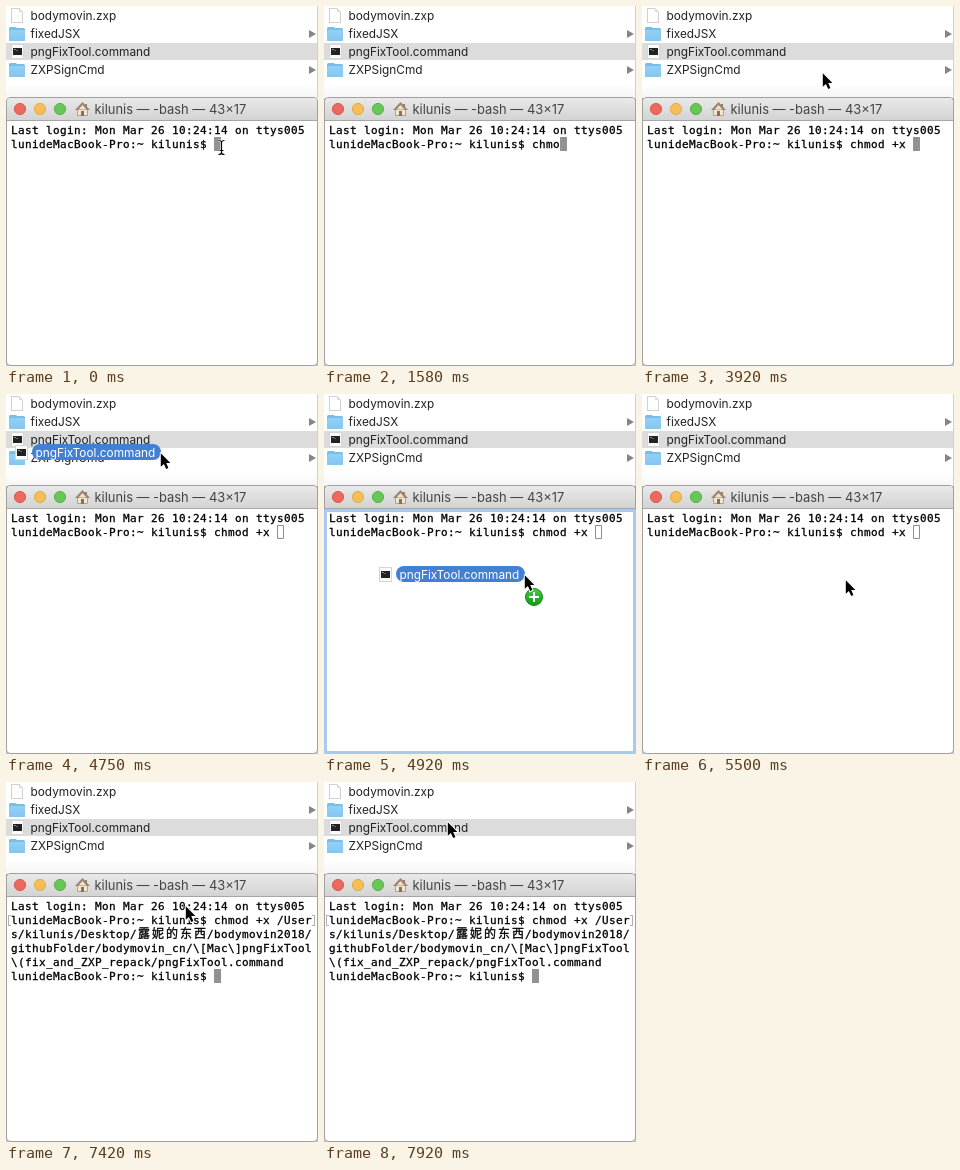
Recreate the animation shown at these times as an HTML page with a canvas. Size 312x360 px, loop 8000 ms.

```html
<!DOCTYPE html>
<html lang="en">
<head>
<meta charset="utf-8">
<title>Terminal drag and drop</title>
<style>
  html, body { margin: 0; width: 312px; height: 360px; overflow: hidden; background: #fff; }
  canvas { display: block; }
</style>
</head>
<body>
<canvas id="stage" width="312" height="360"></canvas>
<script>
const ctx = document.getElementById('stage').getContext('2d');
const LOOP = 8000, TICK = 1000 / 12;
const CELL_W = 7, CELL_H = 14, COLS = 43, LEFT = 5, TOP = 117;
const UI = 'Inter, Roboto, sans-serif';
const MONO = '11px "DejaVu Sans Mono", monospace';
const CJK = '500 12px "Noto Sans CJK SC", "Noto Sans CJK", sans-serif';

const LOGIN = 'Last login: Mon Mar 26 10:24:14 on ttys005\n';
const PROMPT = 'lunideMacBook-Pro:~ kilunis$ ';
const COMMAND = 'chmod +x ';
const PATH = '/Users/kilunis/Desktop/露妮的东西/bodymovin2018/githubFolder/' +
  'bodymovin_cn/\\[Mac\\]pngFixTool\\(fix_and_ZXP_repack/pngFixTool.command ';
const FILE = 'pngFixTool.command';
const FILE_SIZE = 11.85;

// All times below are in ticks of 1/12 s.
const KEYS = [10, 12, 16, 18, 21, 24, 29, 36, 41];
const DRAG = 57, DROP = 66, PASTE = 67, FOCUS = 72, ENTER = 79;
const GRAB = [150, 45];
const MOVES = [
  [[45, 200, 121], [46, 190, 92], [47, 180, 66], [49, 168, 53], [51, 158, 48], [54, ...GRAB],
   [56, ...GRAB], [57, 154, 58], [58, 174, 112], [59, 200, 180], [61, 203, 185], [78, 203, 185]],
  [[87, 206, 205], [88, 194, 162], [89, 179, 123], [90, 163, 87], [91, 148, 60],
   [92, 136, 43], [93, 128, 34], [94, 124, 36], [95, 123, 39], [96, 123, 39]]
];

function pointerAt(n) {
  const path = MOVES.find(p => n >= p[0][0] && n <= p[p.length - 1][0]);
  if (!path) return null;
  const i = Math.max(1, path.findIndex(k => k[0] >= n));
  const [t0, x0, y0] = path[i - 1], [t1, x1, y1] = path[i];
  const f = (n - t0) / (t1 - t0);
  return [Math.round(x0 + (x1 - x0) * f), Math.round(y0 + (y1 - y0) * f)];
}

function rect(x, y, w, h, color) {
  ctx.fillStyle = color;
  ctx.fillRect(x, y, w, h);
}

function frame(x, y, w, h, color, line = 1) {
  ctx.strokeStyle = color;
  ctx.lineWidth = line;
  ctx.strokeRect(x + line / 2, y + line / 2, w - line, h - line);
}

function poly(points, color) {
  ctx.beginPath();
  points.forEach(([x, y]) => ctx.lineTo(x, y));
  ctx.closePath();
  ctx.fillStyle = color;
  ctx.fill();
}

function round(x, y, w, h, r, color) {
  ctx.beginPath();
  ctx.roundRect(x, y, w, h, r);
  ctx.fillStyle = color;
  ctx.fill();
}

function disc(x, y, r, color, edge) {
  ctx.beginPath();
  ctx.arc(x, y, r, 0, Math.PI * 2);
  ctx.fillStyle = color;
  ctx.fill();
  ctx.strokeStyle = edge;
  ctx.lineWidth = 1;
  ctx.stroke();
}

function label(text, x, y, size, color) {
  ctx.font = `${size}px ${UI}`;
  ctx.fillStyle = color;
  ctx.fillText(text, x, y);
}

function vertical(y0, y1, from, to) {
  const g = ctx.createLinearGradient(0, y0, 0, y1);
  g.addColorStop(0, from);
  g.addColorStop(1, to);
  return g;
}

function paper(x, y) {
  poly([[x, y], [x + 8, y], [x + 12, y + 4], [x + 12, y + 15], [x, y + 15]], '#d0d0d0');
  poly([[x + 1, y + 1], [x + 7.5, y + 1], [x + 11, y + 4.5], [x + 11, y + 14], [x + 1, y + 14]], '#fff');
  poly([[x + 8, y], [x + 12, y + 4], [x + 8, y + 4]], '#dcdcdc');
}

function scriptIcon(x, y) {
  rect(x, y, 13, 15, '#d6d6d6');
  rect(x + 1, y + 1, 11, 13, '#fafafa');
  rect(x + 2, y + 4, 9, 7, '#222');
  rect(x + 3, y + 5, 2, 1, '#888');
  rect(x + 5, y + 6, 2, 1, '#666');
}

function folder(y) {
  round(3, y, 8, 5, 1.5, '#7abde6');
  round(3, y + 1, 16, 13, 1.5, '#7abde6');
  round(3, y + 3, 16, 11, 1.5, vertical(y + 3, y + 14, '#93d0f5', '#84c6f0'));
  poly([[303, y + 3], [310, y + 7], [303, y + 11]], '#858585');
}

function drawFinder() {
  rect(0, 0, 312, 92, '#fff');
  rect(0, 37, 312, 17, '#dcdcdc');
  paper(5, 2);
  folder(21);
  scriptIcon(5, 38);
  folder(57);
  ['bodymovin.zxp', 'fixedJSX', FILE, 'ZXPSignCmd']
    .forEach((name, i) => label(name, 24.5, 14 + 18 * i, FILE_SIZE, '#222'));
  rect(0, 78, 312, 14, vertical(78, 92, 'rgba(0,0,0,0)', 'rgba(0,0,0,.04)'));
  rect(311, 0, 1, 92, '#d0d0d0');
}

function drawHouse() {
  rect(71, 103, 11, 7, '#f1e6d2');
  frame(71, 103, 11, 7, '#b0a08c');
  rect(75, 105, 3, 5, '#8d6e54');
  rect(79, 98, 2, 4, '#9a7c66');
  poly([[76.5, 96], [84, 104], [69, 104]], '#9c8270');
  poly([[76.5, 99], [80.5, 103.5], [72.5, 103.5]], '#efe3cd');
}

function drawWindow() {
  rect(0, 352, 312, 8, '#c4c4c4');
  round(0, 91, 312, 269, 5, '#a0a0a0');
  round(1, 92, 310, 267, 4, '#fff');
  round(1, 92, 310, 22, [4, 4, 0, 0], vertical(92, 114, '#e9e9e9', '#d3d3d3'));
  rect(1, 114, 310, 1, '#a6a6a6');
  disc(14, 103, 5.6, '#ec695f', '#da5a50');
  disc(34, 103, 5.6, '#f4bf58', '#dfab49');
  disc(54, 103, 5.6, '#68c658', '#58b24a');
  drawHouse();
  label('kilunis — -bash — 43×17', 88.5, 108, 12.9, '#444');
}

// Writes on the character grid, wraps, and returns the pixel position of the caret.
function write(text) {
  let col = 0, row = 0;
  ctx.fillStyle = ctx.strokeStyle = '#000';
  ctx.lineWidth = 0.3;
  for (const ch of text) {
    if (ch === '\n') { col = 0; row++; continue; }
    const wide = ch > '\u2e80';
    if (col + (wide ? 2 : 1) > COLS) { col = 0; row++; }
    const x = LEFT + col * CELL_W + (wide ? 1 : 0), y = TOP + row * CELL_H + 11;
    ctx.font = wide ? CJK : MONO;
    ctx.fillText(ch, x, y);
    ctx.strokeText(ch, x, y);
    col += wide ? 2 : 1;
  }
  return [LEFT + col * CELL_W, TOP + row * CELL_H];
}

function drawMarks() {
  for (const [x, edge] of [[2, 2], [306, 308]]) {
    rect(edge, 133, 1, 11, '#b0b0b0');
    rect(x, 133, 3, 1, '#b0b0b0');
    rect(x, 143, 3, 1, '#b0b0b0');
  }
}

function drawTerminal(n) {
  const typed = KEYS.filter(k => n >= k).length;
  let text = LOGIN + PROMPT + COMMAND.slice(0, typed);
  if (n >= PASTE) text += PATH;
  if (n >= ENTER) {
    text += '\n' + PROMPT;
    drawMarks();
  }
  const [x, y] = write(text);
  if (n >= DRAG && n < FOCUS) frame(x, y, CELL_W, CELL_H, '#8e8e8e');
  else rect(x, y, CELL_W, CELL_H, '#929295');
}

function drawDrag(x, y) {
  const dx = x - GRAB[0], dy = y - GRAB[1];
  if (y > 115) frame(0, 115, 312, 245, '#a9c9f2', 3);
  scriptIcon(5 + dx, 38 + dy);
  round(22 + dx, 37 + dy, 129, 16, 8, '#437fd3');
  label(FILE, 25.5 + dx, 50 + dy, FILE_SIZE, '#fff');
  if (y > 115) {
    disc(x + 10, y + 23, 8.5, vertical(y + 14, y + 32, '#4cc94c', '#0d980f'), '#0f8a12');
    rect(x + 5, y + 22, 10, 2, '#fff');
    rect(x + 9, y + 18, 2, 10, '#fff');
  }
}

function drawPointer(x, y) {
  const shape = [[0, 0], [0, 13.5], [3.1, 10.6], [5.4, 15.8], [7.6, 14.8], [5.4, 9.7], [9.6, 9.6]]
    .map(([px, py]) => [x + px + 0.8, y + py + 1.3]);
  ctx.lineJoin = 'round';
  ctx.strokeStyle = '#fff';
  ctx.lineWidth = 2;
  poly(shape, '#000');
  ctx.stroke();
  poly(shape, '#000');
}

function drawIBeam(x, y) {
  for (const [color, line] of [['#fff', 2.4], ['#000', 1.2]]) {
    ctx.strokeStyle = color;
    ctx.lineWidth = line;
    ctx.beginPath();
    for (const s of [-1, 1]) {
      ctx.moveTo(x - 3, y + 7 * s);
      ctx.quadraticCurveTo(x, y + 7 * s, x, y + 5 * s);
      ctx.quadraticCurveTo(x, y + 7 * s, x + 3, y + 7 * s);
    }
    ctx.moveTo(x, y - 6);
    ctx.lineTo(x, y + 6);
    ctx.moveTo(x - 2, y + 3);
    ctx.lineTo(x + 2, y + 3);
    ctx.stroke();
  }
}

function draw(now) {
  const n = Math.floor((now % LOOP + 4) / TICK);
  drawFinder();
  drawWindow();
  drawTerminal(n);
  const pointer = pointerAt(n);
  if (pointer) {
    if (n >= DRAG && n < DROP) drawDrag(...pointer);
    drawPointer(...pointer);
  } else if (n < KEYS[0]) {
    drawIBeam(215.5, 141.5);
  }
  requestAnimationFrame(() => draw(performance.now()));
}

draw(performance.now());
</script>
</body>
</html>
```
